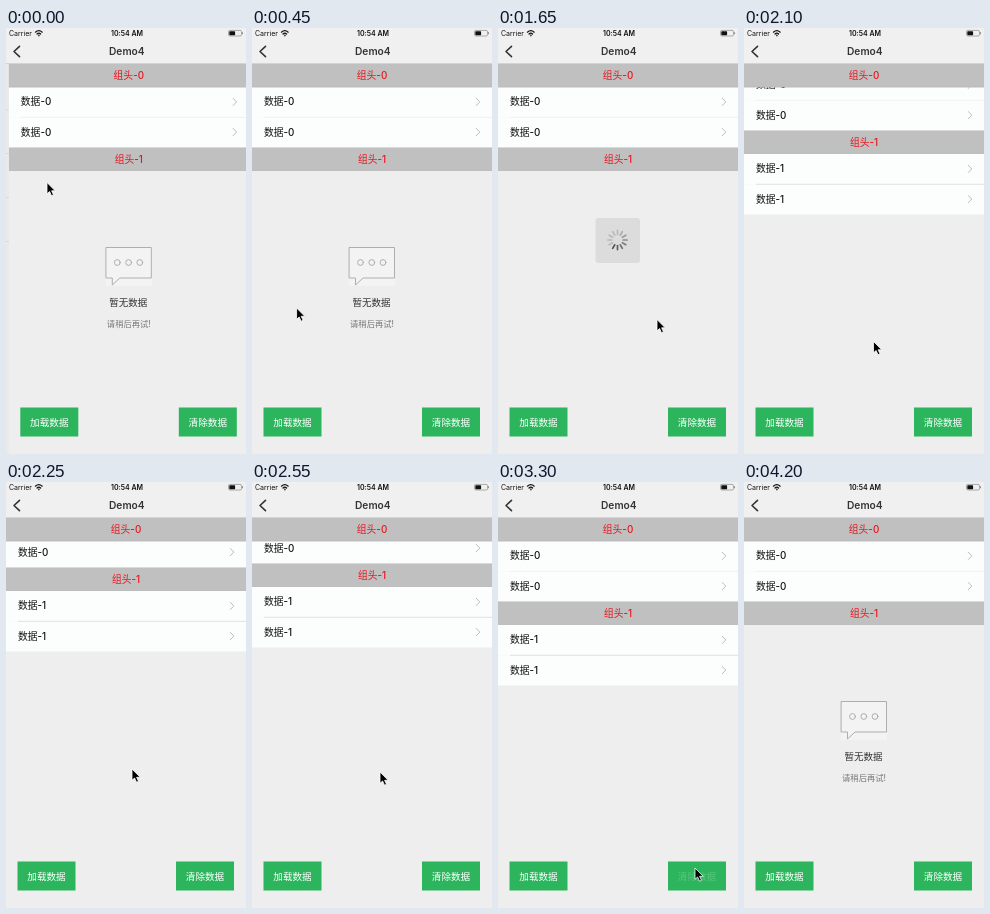
Write an HTML page that moves like this. It is 240 px wide and 426 px high and loops after 4350 ms.

```html
<!DOCTYPE html>
<html lang="zh-CN">
<head>
<meta charset="utf-8">
<title>Demo4</title>
<style>
  html, body { margin: 0; width: 100%; height: 100%; overflow: hidden; background: #eee; }
  svg { display: block; width: 100vw; height: 100vh; }
  text { font-family: Inter, "Noto Sans CJK SC", "Noto Sans CJK", sans-serif; }
  .mid { text-anchor: middle; }
  .cell { font-size: 9.8px; font-weight: 500; fill: #111; }
  .head { font-size: 9.8px; font-weight: 500; fill: #e8141c; }
  .label { font-size: 9.6px; fill: #fff; }
  .bar { font-size: 7px; fill: #111; }
  .line { fill: none; stroke-linecap: round; stroke-linejoin: round; }
</style>
</head>
<body>
<svg viewBox="0 0 240 426">
  <defs>
    <clipPath id="body"><rect x="0" y="36" width="240" height="390"/></clipPath>
  </defs>
  <rect width="240" height="426" fill="#eaeaea"/>
  <path d="M0 82h3M0 125.500h3M0 169.500h3M0 213.500h3" stroke="#d2d2d2" stroke-width=".8"/>

  <g id="page">
    <rect width="240" height="426" fill="#eee"/>
    <g clip-path="url(#body)"><g id="list"></g></g>
    <g id="sticky"></g>
    <g id="empty">
      <rect x="97" y="219" width="46" height="39" fill="#f3f3f3"/>
      <g class="line" stroke="#a6a6a6" stroke-width=".9">
        <path d="M97.500 219.500H142.500V250H111L103.500 257V250H97.500Z"/>
        <circle cx="108.500" cy="234.500" r="2.900"/>
        <circle cx="119.800" cy="234.500" r="2.900"/>
        <circle cx="131" cy="234.500" r="2.900"/>
      </g>
      <text class="mid" x="119.500" y="278.300" font-size="9.500" fill="#333">暂无数据</text>
      <text class="mid" x="120" y="298.800" font-size="8.300" fill="#777">请稍后再试!</text>
    </g>
    <g id="hud">
      <rect x="97.500" y="190" width="44.500" height="45" rx="3" fill="#dcdcdc"/>
      <g id="spinner" transform="translate(119.500 212)"></g>
    </g>
    <rect x="11.500" y="379.500" width="58" height="29" fill="#2db55d"/>
    <text id="load" class="label mid" x="40.500" y="397.600">加载数据</text>
    <rect x="170" y="379.500" width="58" height="29" fill="#2db55d"/>
    <text id="clear" class="label mid" x="199" y="397.600">清除数据</text>
  </g>

  <rect width="240" height="36" fill="#f0f0f0"/>
  <rect y="35.500" width="240" height=".5" fill="#b4b4b4"/>
  <text class="bar" x="3" y="7.600" font-size="7">Carrier</text>
  <g class="line" stroke="#111" stroke-width="1.200">
    <path d="M29.400 4.200Q32.800 1 36.200 4.200M31 6Q32.800 4.200 34.600 6"/>
    <circle cx="32.800" cy="7.400" r=".3"/>
  </g>
  <text class="bar mid" x="121" y="7.600" font-weight="600">10:54 AM</text>
  <rect x="222.500" y="2.400" width="13" height="5.600" rx="1.400" fill="none" stroke="#777" stroke-width=".6"/>
  <rect x="223.300" y="3.200" width="5.800" height="4" rx=".7" fill="#111"/>
  <path d="M236.500 4.200v2" stroke="#777" stroke-width=".8"/>
  <path class="line" d="M13.500 18.300L8 23.500L13.500 28.700" stroke="#333" stroke-width="1.600"/>
  <text class="mid" x="120.800" y="27" font-size="10.200" font-weight="600" fill="#333">Demo4</text>

  <path id="cursor" d="M0 0V11.300L2.600 9L4.500 13.200L6.500 12.300L4.600 8.300H8.200Z"
        fill="#000" stroke="#fff" stroke-width=".8" stroke-linejoin="round"/>
</svg>

<script>
const LOOP = 4350, STEP = 150;
const LOADED = 1950, CLEARED = 3450, HUD_ON = 1050;
const $ = id => document.getElementById(id);

const header = (y, n) => `<rect y="${y}" width="240" height="23.3" fill="#c0c0c0"/>
  <path d="M0 ${y + 23}H240" stroke="#b2b2b2" stroke-width=".5"/>
  <text class="head mid" x="120" y="${y + 15.4}">组头-${n}</text>`;

const row = (y, n) => `<rect y="${y}" width="240" height="30.2" fill="#fcfefd"/>
  <text class="cell" x="12" y="${y + 18.4}">数据-${n}</text>
  <path class="line" d="M224.300 ${y + 11.3}l3.500 3.600l-3.500 3.600" stroke="#bcbcbc" stroke-width="1"/>`;

const divider = (y, color) =>
  `<rect x="12" y="${y}" width="228" height=".8" fill="${color}"/>`;

$("list").innerHTML = row(59, 0) + row(89.2, 0) + divider(88.8, "#edefee") + header(119.5, 1) +
  `<g id="extra">${row(143, 1) + row(173.2, 1) + divider(172.8, "#d9dbda")}</g>`;
$("sticky").innerHTML = header(36, 0);

for (let i = 0; i < 12; i++) {
  const shade = Math.round(80 + 105 * Math.min(1, i / 7));
  $("spinner").innerHTML += `<path class="line" d="M0 -5.600V-9.600" stroke-width="1.700"
    stroke="rgb(${shade},${shade},${shade})" transform="rotate(${-30 * i})"/>`;
}

// Linear interpolation through [time, value] pairs
function track(keys, t) {
  const i = keys.findIndex(k => k[0] > t);
  if (i === 0) return keys[0][1];
  if (i < 0) return keys[keys.length - 1][1];
  const [t0, a] = keys[i - 1], [t1, b] = keys[i];
  return a + (b - a) * (t - t0) / (t1 - t0);
}

const cursorX = [[0, 41], [150, 41], [900, 50], [1200, 50], [1650, 159], [1950, 133],
  [2250, 126], [2550, 128], [2850, 195], [3150, 197], [3600, 197], [4050, 246]];
const cursorY = [[0, 154.5], [150, 165], [450, 280], [750, 378], [900, 386], [1200, 386],
  [1650, 291.5], [1950, 340], [2250, 287], [2400, 275], [2550, 290], [2850, 352],
  [3150, 386], [3600, 386], [4050, 350]];
const scroll = [[1950, 0], [2250, 34], [2400, 42], [2550, 38], [2700, 25], [2850, 13],
  [3000, 5], [3150, 1], [3300, 0]];
const loadFade = [[750, 1], [900, .2], [1050, .45], [1350, 1]];
const clearFade = [[3150, 1], [3300, .2], [3450, .45], [3750, 1]];

const move = (id, x, y) => $(id).setAttribute("transform", `translate(${x} ${y})`);
const show = (id, on) => $(id).style.display = on ? "" : "none";

function draw(t) {
  const full = t >= LOADED && t < CLEARED;
  const busy = t >= HUD_ON && t < LOADED;
  move("page", t < STEP ? 2.8 : 0, 0);
  move("list", 0, -track(scroll, t));
  move("cursor", track(cursorX, t), track(cursorY, t));
  show("extra", full);
  show("hud", busy);
  show("empty", !full && !busy);
  const turn = 300 + Math.floor((t - HUD_ON) / 800 * 12) * 30;
  $("spinner").setAttribute("transform", `translate(119.500 212) rotate(${turn})`);
  $("load").style.opacity = track(loadFade, t);
  $("clear").style.opacity = track(clearFade, t);
}

const start = performance.now();
function tick() {
  const t = (performance.now() - start) % LOOP;
  draw(Math.floor(t / STEP) * STEP);
  requestAnimationFrame(tick);
}
tick();
</script>
</body>
</html>
```
